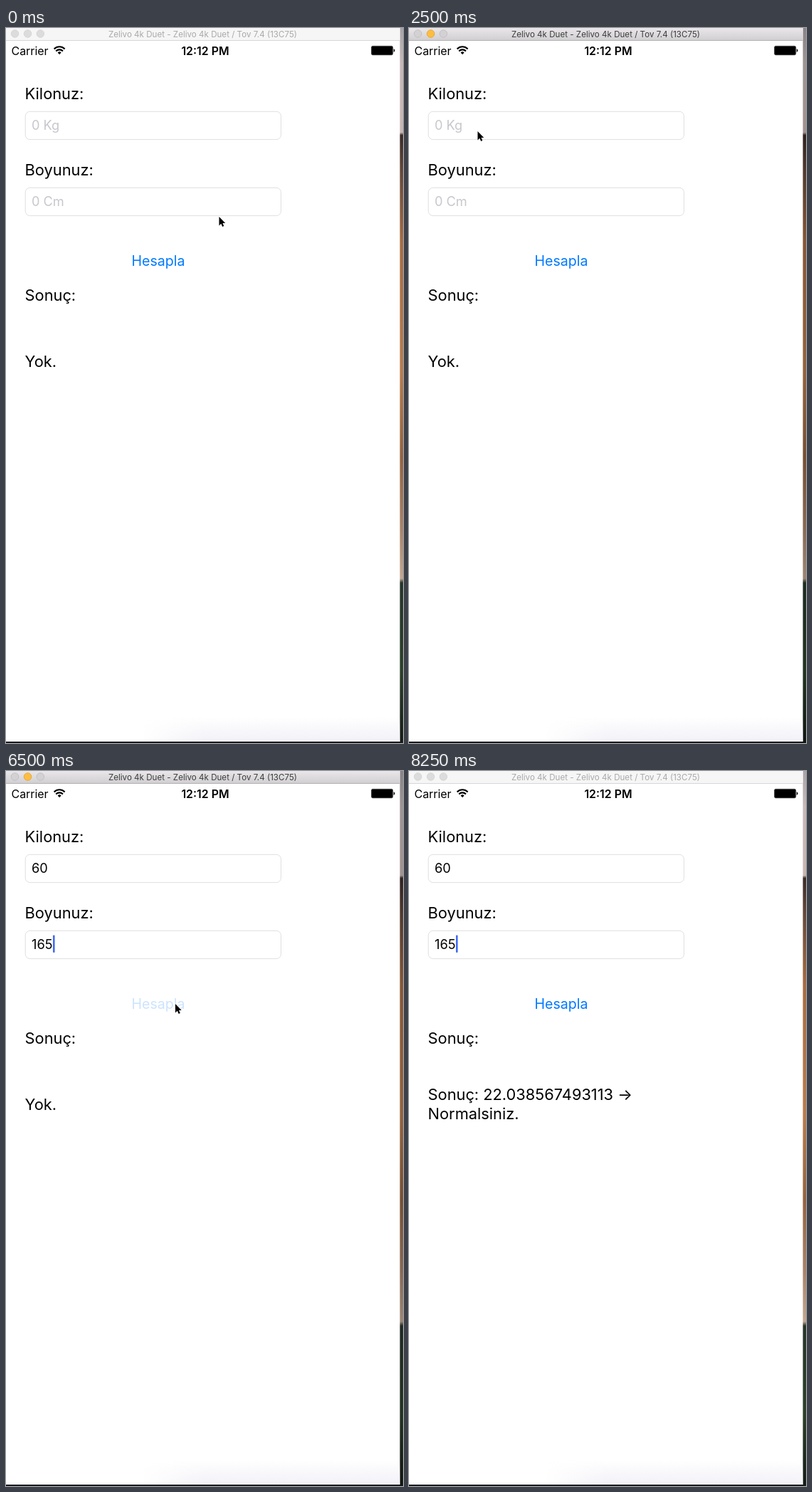
These frames come from a looping animation (558 px wide and 1004 px high, 8500 ms). An HTML page:

```html
<!DOCTYPE html>
<html lang="tr">
<head>
<meta charset="utf-8">
<style>
html, body { margin: 0; width: 100%; height: 100%; overflow: hidden; background: #fff }
svg { display: block; font-family: Inter, Roboto, sans-serif; font-size: 21.8px }
.field { fill: #fff; stroke: #dcdcdc; stroke-width: .9 }
.input { font-size: 18.2px }
.caret { fill: #426bf2 }
.status { font-size: 15.9px }
#title { font-size: 11.6px; text-anchor: middle }
#button { font-size: 19.6px; fill: #007aff; text-anchor: middle }
</style>
</head>
<body>
<svg width="558" height="1004" viewBox="0 0 558 1004">
  <defs>
    <linearGradient id="bar" x2="0" y2="1">
      <stop stop-color="#e9e7e9"/><stop offset="1" stop-color="#d1cfd1"/>
    </linearGradient>
    <linearGradient id="desk" x2="0" y2="1">
      <stop stop-color="#a9a4a8"/><stop offset=".05" stop-color="#c6b9b9"/>
      <stop offset=".146" stop-color="#c9b6b2"/><stop offset=".15" stop-color="#3b2b27"/>
      <stop offset=".2" stop-color="#65483a"/><stop offset=".3" stop-color="#a86c42"/>
      <stop offset=".48" stop-color="#b97c4c"/><stop offset=".6" stop-color="#94633f"/>
      <stop offset=".7" stop-color="#a98369"/><stop offset=".77" stop-color="#c2a790"/>
      <stop offset=".776" stop-color="#26352a"/><stop offset=".9" stop-color="#2b4029"/>
      <stop offset="1" stop-color="#151b16"/>
    </linearGradient>
    <linearGradient id="foot" x2="0" y2="1">
      <stop stop-color="#f1f1f8" stop-opacity="0"/><stop offset="1" stop-color="#f1f1f8"/>
    </linearGradient>
    <linearGradient id="fade">
      <stop stop-color="#fff"/><stop offset=".25" stop-color="#fff" stop-opacity="0"/>
    </linearGradient>
  </defs>

  <rect width="558" height="1004" fill="#1c1c1e"/>
  <rect x="553" width="5" height="1004" fill="url(#desk)"/>
  <rect id="shade" x="553" width="5" height="1004" opacity=".2"/>
  <rect width="553.6" height="1002" fill="#fff"/>
  <rect x="190" y="968" width="363.6" height="34" fill="url(#foot)"/>
  <rect x="190" y="968" width="363.6" height="34" fill="url(#fade)"/>

  <rect id="titlebar" width="553.6" height="17"/>
  <rect id="rule" y="17" width="553.6" height="1"/>
  <g id="lights" stroke-width=".8">
    <circle cx="12.5" cy="8" r="5.3"/><circle cx="30.5" cy="8" r="5.3"/><circle cx="48.3" cy="8" r="5.3"/>
  </g>
  <text id="title" x="276.5" y="12.6">Zelivo 4k Duet - Zelivo 4k Duet / Tov 7.4 (13C75)</text>

  <text class="status" x="7.6" y="37.6">Carrier</text>
  <g fill="none" stroke="#000" stroke-width="2.1">
    <path d="M67.6 29.4a10.6 10.6 0 0 1 15 0M70.2 32.4a7 7 0 0 1 9.8 0"/>
  </g>
  <path d="M75.1 37.2l-2.5-2.7a3.6 3.6 0 0 1 5 0z"/>
  <text class="status" x="280" y="37.6" font-weight="600" text-anchor="middle">12:12 PM</text>
  <rect x="513.5" y="25.3" width="30.3" height="12.6" rx="2" stroke="#555" stroke-width=".7"/>
  <path d="M544.8 29.2q1.7.5 1.7 2.4t-1.7 2.4z"/>

  <text x="26.6" y="100.4">Kilonuz:</text>
  <rect class="field" x="27.2" y="117.3" width="359.3" height="39.3" rx="6.5"/>
  <text class="input" id="weight" x="36" y="143"></text>
  <rect class="caret" id="caret1" y="123.5" width="2.6" height="24.5" rx="1"/>

  <text x="26.6" y="207.4">Boyunuz:</text>
  <rect class="field" x="27.2" y="224.3" width="359.3" height="39.3" rx="6.5"/>
  <text class="input" id="height" x="36" y="250"></text>
  <rect class="caret" id="caret2" y="230.5" width="2.6" height="24.5" rx="1"/>

  <text id="button" x="214" y="334">Hesapla</text>
  <text x="26.6" y="382.6">Sonuç:</text>
  <text id="none" x="26.6" y="475.6">Yok.</text>
  <g id="result">
    <text x="26.6" y="461.8">Sonuç: 22.038567493113 -&gt;</text>
    <text x="26.6" y="488.6">Normalsiniz.</text>
  </g>

  <path id="mouse" d="M0 0V12.4L2.8 9.8L4.7 14L6.8 13.1L5 9H8.7Z" stroke="#fff" stroke-width="1.2" paint-order="stroke"/>
</svg>
<script>
const LOOP = 8500, STEP = 250;
const $ = id => document.getElementById(id);

// [time, x, y] of the pointer tip
const path = [
  [0, 299.5, 265], [1000, 100.5, 147], [1500, 100.5, 147], [2000, 96.5, 145],
  [5500, 96.5, 145], [6400, 238, 327], [6750, 238, 327], [7250, 388.5, 303], [7750, 570, 262]
];

function pointer(t) {
  const i = path.findIndex(p => p[0] > t);
  if (i < 0) return path[path.length - 1].slice(1);
  const [t0, x0, y0] = path[i - 1], [t1, x1, y1] = path[i];
  const u = (t - t0) / (t1 - t0), k = u * u * (3 - 2 * u);
  return [x0 + (x1 - x0) * k, y0 + (y1 - y0) * k];
}

const show = (el, on) => el.setAttribute('visibility', on ? 'visible' : 'hidden');

function input(id, caretId, value, hint, caretOn) {
  const text = $(id), caret = $(caretId);
  text.textContent = value || hint;
  text.setAttribute('fill', value ? '#000' : '#c7c7cd');
  caret.setAttribute('x', 36.5 + (value ? text.getComputedTextLength() : 0));
  show(caret, caretOn);
}

function chrome(active) {
  $('titlebar').setAttribute('fill', active ? 'url(#bar)' : '#f6f6f6');
  $('rule').setAttribute('fill', active ? '#b4b2b4' : '#d6d6d6');
  $('title').setAttribute('fill', active ? '#3c3c3c' : '#a9a9a9');
  show($('shade'), active);
  [...$('lights').children].forEach((c, i) => {
    const yellow = active && i === 1;
    c.setAttribute('fill', yellow ? '#fdbd40' : active ? '#d3d1d3' : '#dcdcdc');
    c.setAttribute('stroke', yellow ? '#e0a136' : active ? '#bdbbbd' : '#d2d2d2');
  });
}

function draw(now) {
  const t = Math.floor(now % LOOP / STEP) * STEP;
  chrome(t >= 1250 && t < 7750);

  const weight = t < 3250 ? '' : t < 3500 ? '6' : '60';
  const height = t < 4500 ? '' : t < 5000 ? '1' : '165';
  const blink = t < 2250 || t >= 2750;
  input('weight', 'caret1', weight, '0 Kg', t >= 1750 && t < 3750 && blink);
  input('height', 'caret2', height, '0 Cm', t >= 3750 && t !== 4250);

  $('button').setAttribute('opacity', t === 6500 ? .2 : 1);
  show($('none'), t < 6750);
  show($('result'), t >= 6750);
  $('mouse').setAttribute('transform', `translate(${pointer(t)})`);
}

const start = performance.now();
function tick() {
  draw(performance.now() - start);
  requestAnimationFrame(tick);
}
tick();
</script>
</body>
</html>
```
